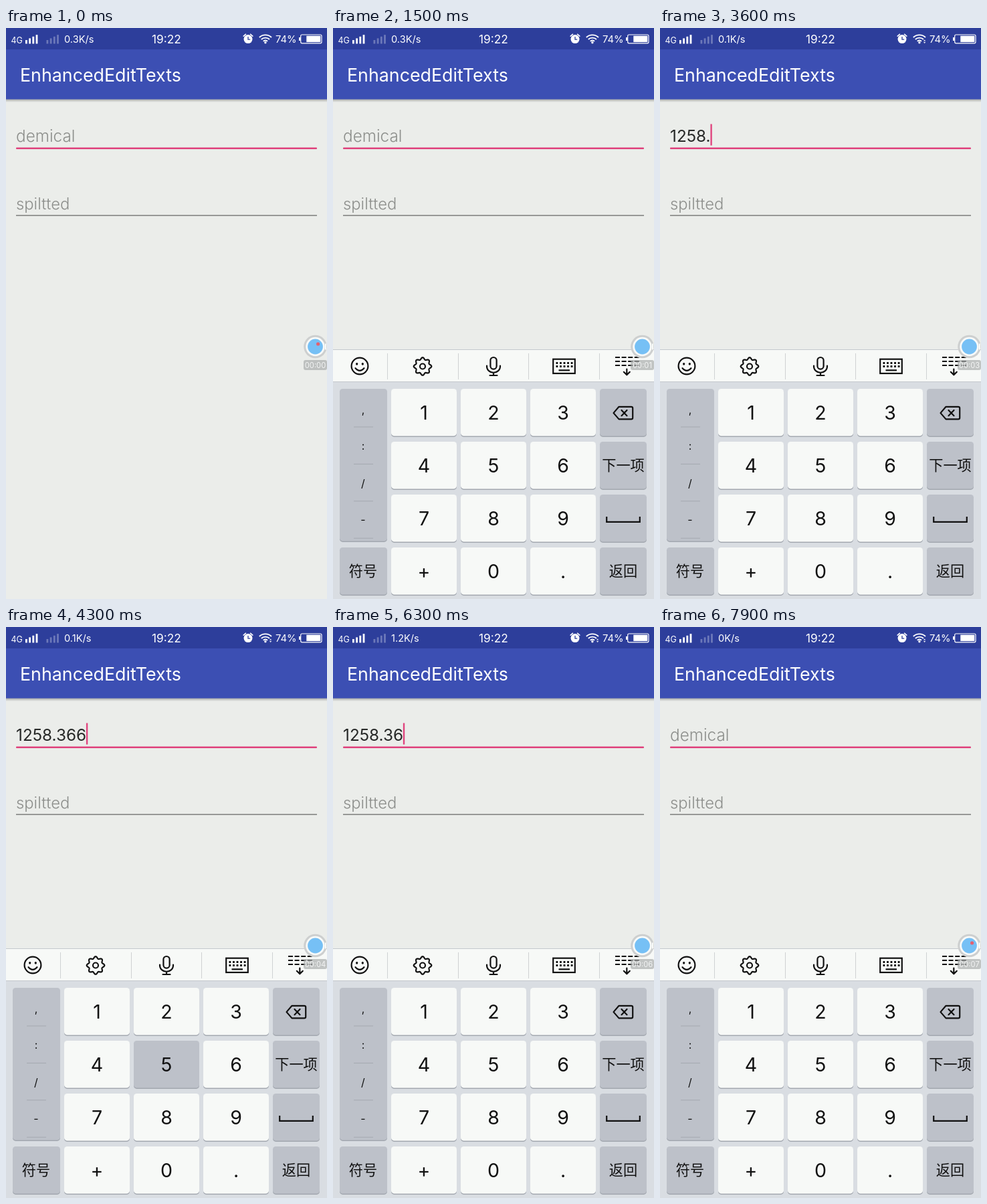
An HTML page that plays this animation: 480x853 px, repeating every 8000 ms.

```html
<!DOCTYPE html>
<html lang="en">
<head>
<meta charset="utf-8">
<title>EnhancedEditTexts</title>
<style>
html, body { margin: 0; width: 100%; height: 100%; overflow: hidden; background: #ebedea; }
svg { display: block; width: 100%; height: 100%; font-family: Inter, Roboto, sans-serif; }
text { white-space: pre; }
.mid { text-anchor: middle; }
.cjk { font: 21.2px "Noto Sans CJK SC", "Noto Sans CJK", sans-serif; }
.line { fill: none; stroke: #111; stroke-width: 2.2; stroke-linecap: round; stroke-linejoin: round; }
</style>
</head>
<body>
<svg viewBox="0 0 480 853" preserveAspectRatio="none">
  <defs>
    <linearGradient id="shade" x2="0" y2="1">
      <stop stop-color="#000" stop-opacity=".3"/>
      <stop offset="1" stop-color="#000" stop-opacity="0"/>
    </linearGradient>
  </defs>
  <rect width="480" height="853" fill="#ebedea"/>
  <rect y="106" width="480" height="5" fill="url(#shade)"/>
  <rect width="480" height="106.5" fill="#3c4fb3"/>
  <rect width="480" height="32" fill="#2d3e9b"/>

  <g id="status" fill="#fff" font-size="14.6">
    <text x="7.5" y="23" font-size="12.5">4G</text>
    <text id="speed" x="87" y="22"></text>
    <text x="240" y="23" font-size="17.3" class="mid">19:22</text>
    <text x="403" y="22" font-size="14.8">74%</text>
    <circle cx="362" cy="16.6" r="6.5"/>
    <path d="M355.2 12.2l3.2-2.8M368.8 12.2l-3.2-2.8" stroke="#fff" stroke-width="1.6" stroke-linecap="round"/>
    <path d="M362 13v4.2h3.2" fill="none" stroke="#2d3e9b" stroke-width="1.3"/>
    <g fill="none" stroke="#fff" stroke-width="1.8">
      <path d="M378.8 14a13 13 0 0 1 18.2 0M381.8 17a9 9 0 0 1 12.2 0M384.7 19.8a5 5 0 0 1 6.4 0"/>
    </g>
    <circle cx="387.9" cy="21.8" r="1.7"/>
    <path id="traffic" d="M394 19.6l1.6-2 1.6 2zM394 21l1.6 2 1.6-2z"/>
    <rect x="440.7" y="10" width="31.3" height="12.8" rx="2" fill="none" stroke="#fff" stroke-width="1.2"/>
    <rect x="438" y="14" width="2" height="5"/>
    <rect x="449.3" y="11.7" width="21" height="9.4"/>
  </g>
  <text x="21" y="80.3" font-size="26.8" fill="#fff">EnhancedEditTexts</text>

  <g font-size="24.3" font-weight="300">
    <text id="hint" x="15" y="170" fill="#8c8e8b">demical</text>
    <text id="field" x="15" y="170" font-weight="400" fill="#262827"></text>
    <text x="15" y="271.2" font-size="23.8" fill="#8c8e8b">spiltted</text>
  </g>
  <rect x="15" y="178.4" width="450" height="2.6" rx="1" fill="#df417c"/>
  <rect x="15" y="279.3" width="450" height="1.5" fill="#7c7e7c"/>
  <rect id="caret" y="143.5" width="2.4" height="32" fill="#e0457f"/>

  <g id="board">
    <rect y="480" width="480" height="373" fill="#d9dde2"/>
    <rect y="480" width="480" height="49" fill="#c4c8cd"/>
    <rect y="481" width="480" height="47" fill="#f7f9f7"/>
    <path d="M81.5 486v39M187.5 486v39M292.5 486v39M398.5 486v39" stroke="#cfd2d3"/>
    <g class="line">
      <circle cx="40" cy="505" r="12.4"/>
      <path d="M33.6 508.2q6.4 7.4 12.8 0"/>
      <path d="M35.7 501.5v.6M44.3 501.5v.6" stroke-width="3.2"/>
      <path id="gear"/>
      <circle cx="134" cy="505.5" r="4"/>
      <rect x="235.4" y="492" width="9.2" height="17.6" rx="4.6"/>
      <path d="M230 504.5v1a10 9.4 0 0 0 20 0v-1M240 515v4M234.5 519h11"/>
      <rect x="329.2" y="494.7" width="32.6" height="21.3" stroke-linejoin="miter"/>
      <path d="M333.5 500.5h25M333.5 505.5h25" stroke-width="2.8" stroke-dasharray="2.8 2.75" stroke-linecap="butt"/>
      <path d="M337.5 511.3h16.5" stroke-linecap="butt"/>
      <path d="M422 492h36M422 498h36M422 504h36" stroke-width="2" stroke-dasharray="7 2.6" stroke-linecap="butt"/>
      <path d="M439.3 509.5v8.5M434.8 513.8l4.5 4.5 4.5-4.5"/>
    </g>
    <g id="keys"></g>
    <g class="line">
      <path d="M427.5 565.8H446q2.2 0 2.2 2.2v14.2q0 2.2-2.2 2.2H427.5l-8-9.3zM431.5 571l8 8.2M439.5 571l-8 8.2"/>
      <path d="M409.2 730v7.8h49.6v-7.8" stroke-linecap="butt" stroke-linejoin="miter"/>
    </g>
  </g>

  <g>
    <circle cx="462.5" cy="476" r="17.3" fill="#cdcfcf"/>
    <rect x="477" y="471.5" width="2" height="9" fill="#f8faf9"/>
    <circle cx="462.5" cy="476" r="14.2" fill="#f8faf9"/>
    <circle cx="462.5" cy="476" r="11.4" fill="#76c0f5"/>
    <circle id="dot" cx="466.6" cy="472" r="2.6" fill="#e4606f"/>
    <rect x="445" y="496" width="35" height="15" rx="3" fill="#a9abac" fill-opacity=".68"/>
    <text id="clock" x="462.5" y="507.7" font-size="11.2" fill="#f3f4f4" class="mid"></text>
  </g>
</svg>
<script>
const LOOP = 8000, TICK = 100, REST = 373;
const DARK = '#bdc1c9', LIGHT = '#f7f9f7';
const $ = id => document.getElementById(id);

function add(parent, tag, attrs, label) {
  const el = document.createElementNS('http://www.w3.org/2000/svg', tag);
  for (const name in attrs) el.setAttribute(name, attrs[name]);
  if (label) el.textContent = label;
  return parent.appendChild(el);
}

// Signal bars: one bright set, one faint
for (const [x, opacity] of [[29, 1], [60.5, .3]])
  for (let i = 0; i < 4; i++) {
    const height = 5.5 + 2.6 * i;
    add($('status'), 'rect', { x: x + 5.2 * i, y: 23.5 - height, width: 2.8, height, opacity });
  }

// Gear outline
let gear = '';
for (let i = 0; i < 96; i++) {
  const a = i * Math.PI / 48, r = 11.8 + 1.5 * Math.cos(8 * a);
  gear += (i ? 'L' : 'M') + (134 + r * Math.sin(a)).toFixed(2) + ' ' + (505.5 - r * Math.cos(a)).toFixed(2);
}
$('gear').setAttribute('d', gear + 'Z');

// Keys
const keys = {};
function key(id, x, y, width, height, fill) {
  add($('keys'), 'rect', { x, y: y + 1.5, width, height, rx: 4.5, fill: '#a3a8b0' });
  keys[id] = { fill, el: add($('keys'), 'rect', { x, y, width, height, rx: 4.5, fill }) };
}
const rowY = r => 539 + 79 * r;
['123', '456', '789', '+0.'].forEach((row, r) => [...row].forEach((ch, c) => {
  const x = 87 + 104 * c;
  key(ch, x, rowY(r), 98, 70.4, LIGHT);
  add($('keys'), 'text', { x: x + 49, y: rowY(r) + 46.3, 'font-size': 28.5, fill: '#111', class: 'mid' }, ch);
}));
key('side', 10, 539, 71, 227.4, DARK);
key('sym', 10, rowY(3), 71, 70.4, DARK);
['del', 'next', 'space', 'back'].forEach((id, r) => key(id, 399, rowY(r), 70, 70.4, DARK));
[['符号', 45, 3], ['下一项', 434, 1], ['返回', 434, 3]].forEach(([label, x, r]) =>
  add($('keys'), 'text', { x, y: rowY(r) + 43, fill: '#111', class: 'mid cjk' }, label));
[[',', 576], [':', 630], ['/', 685.5], ['-', 740]].forEach(([ch, y], i) => {
  add($('keys'), 'text', { x: 45, y, 'font-size': 16, fill: '#111', class: 'mid' }, ch);
  add($('keys'), 'rect', { x: 31, y: 595.5 + 55.4 * i, width: 29, height: 1, fill: '#a5a9b0' });
});

// Tables of [start, value]
const typed = [[0, ''], [2200, '1'], [2400, '12'], [2600, '125'], [2800, '1258'], [3400, '1258.'],
  [3800, '1258.3'], [4000, '1258.36'], [4200, '1258.366'], [6200, '1258.36'], [6600, '1258.3'],
  [6700, '1258.'], [6900, '1258'], [7000, '125'], [7100, '12'], [7200, '1'], [7400, '']];
const speeds = [[0, '0.3'], [1900, '0.1'], [5800, '1.2'], [7400, '0']];
const clocks = [[0, 0], [1300, 1], [2100, 2], [3000, 3], [4000, 4], [5000, 5], [6100, 6], [7100, 7]];
const pressed = [[2100, '1'], [2400, '2'], [2600, '5'], [2800, '8'], [3800, '3'], [4000, '6'],
  [4200, '6'], [4300, '5'], [4500, '5'], [4700, '5'], [5100, '5'], [6100, 'del'], [6600, 'del'], [7000, 'del']];
// Times at which a blink flips
const dotFlips = [100, 700, 1100, 1600, 1900, 2200, 2600, 2900, 3400, 3900, 4200, 4600, 5000, 5800, 6200, 6800, 7400, 7900];
const caretFlips = [200, 1200, 1700, 5400, 5900, 7900];

const at = (table, t) => table.filter(([start]) => start <= t).pop()[1];
const flips = (list, t) => list.filter(start => start <= t).length % 2;
const show = (el, on) => el.setAttribute('visibility', on ? 'visible' : 'hidden');

function draw(t) {
  const value = at(typed, t);
  $('field').textContent = value;
  show($('hint'), !value);
  const end = value ? $('field').getComputedTextLength() : 0;
  $('caret').setAttribute('x', 14.8 + end);
  show($('caret'), flips(caretFlips, t));

  $('speed').textContent = at(speeds, t) + 'K/s';
  show($('traffic'), t >= 1900);
  $('clock').textContent = '00:0' + at(clocks, t);
  show($('dot'), !flips(dotFlips, t));

  const left = 1 - Math.min(1, Math.max(0, (t - 800) / 570));
  $('board').setAttribute('transform', `translate(0 ${(REST * left * left).toFixed(1)})`);
  show($('board'), left < 1);

  for (const id in keys) {
    const { el, fill } = keys[id];
    const down = pressed.some(([start, k]) => k === id && t >= start && t < start + TICK);
    el.setAttribute('fill', down ? (fill === LIGHT ? DARK : LIGHT) : fill);
  }
}

const begin = performance.now();
function frame() {
  const t = (performance.now() - begin) % LOOP;
  draw(Math.floor(t / TICK) * TICK);
  requestAnimationFrame(frame);
}
frame();
</script>
</body>
</html>
```
